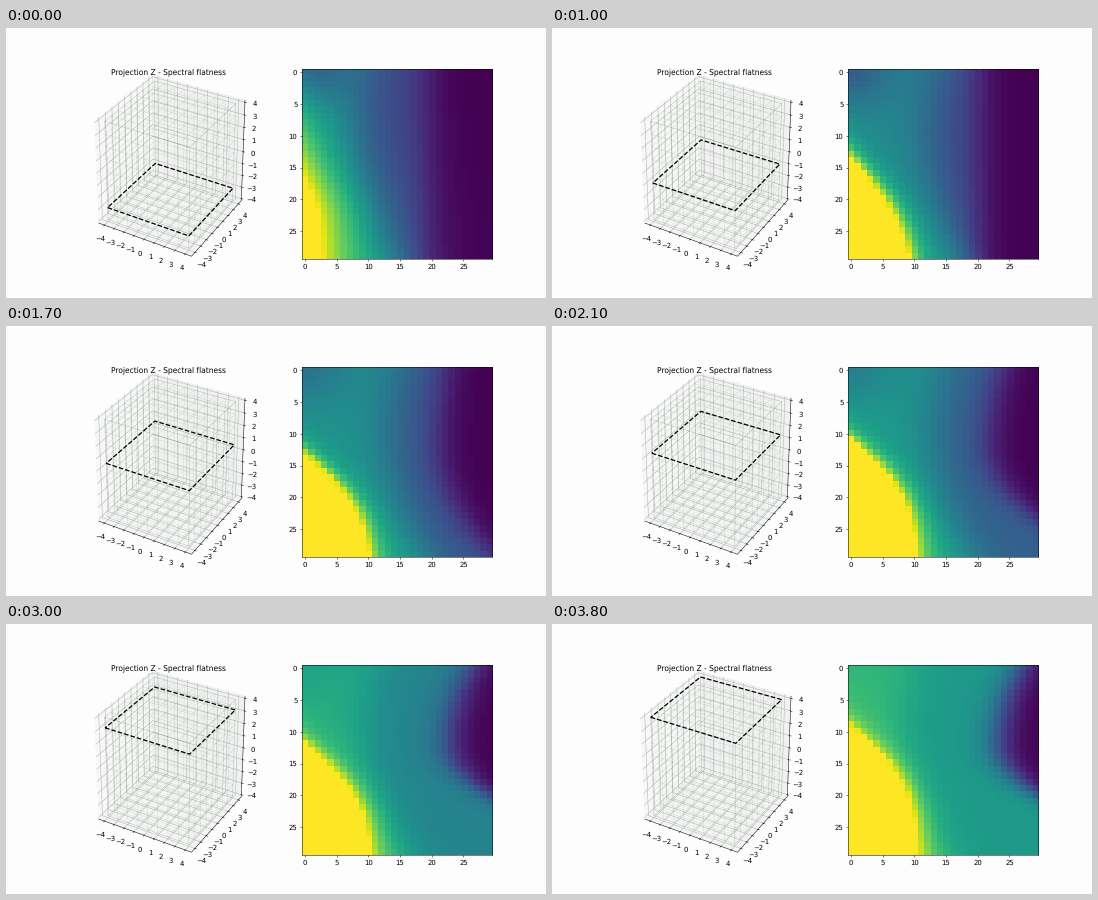
A matplotlib script that plays this animation: 540 px wide and 270 px high, repeating every 3.9 s.

```python
import numpy as np
import matplotlib.pyplot as plt
from matplotlib.animation import FuncAnimation

W, H, DPI = 540, 270, 45
FRAMES, INTERVAL = 39, 100
STEPS = 39                   # slices between z = -4 and z = 4
START = 5                    # slice shown first
PAPER = "#fefdfe"
plt.rcParams.update({"font.family": "DejaVu Sans", "text.hinting": "none",
                     "xtick.labelsize": 11, "ytick.labelsize": 11})

fig = plt.figure(figsize=(W / DPI, H / DPI), dpi=DPI, facecolor=PAPER)
stage = fig.add_axes([0, 0, 1, 1])
stage.set(xlim=(0, W), ylim=(H, 0))
stage.axis("off")

# ---- 3D box: perspective camera around a unit cube ----
AZIM, ELEV, DIST = np.radians(-60), np.radians(30), 10
FORWARD = np.array([np.cos(AZIM) * np.cos(ELEV),
                    np.sin(AZIM) * np.cos(ELEV), np.sin(ELEV)])
RIGHT = np.array([-np.sin(AZIM), np.cos(AZIM), 0])
UP = np.cross(FORWARD, RIGHT)

HALF = 0.5 + 1 / 48          # the panes lie slightly outside the limits
LABEL = HALF + 0.0722
SCALE = np.array([1 / 8.8, 1 / 8.8, 1 / 8])
TICKS = np.arange(-4, 5)
SIDE = 4 * SCALE[0]


def project(points):
    p = np.asarray(points, float)
    depth = DIST - p @ FORWARD
    x = 67.5 + 190.2 * (p @ RIGHT / depth + 0.095) / 0.185
    y = 241 - 207.9 * (p @ UP / depth + 0.095) / 0.185
    return x, y


def line(*points, color="black", lw=0.8, **kw):
    return stage.plot(*project(points), color=color, lw=lw, **kw)[0]


def draw_panes():
    h = HALF
    panes = [
        ([(-h, -h, -h), (-h, h, -h), (-h, h, h), (-h, -h, h)], 0.95),
        ([(-h, h, -h), (h, h, -h), (h, h, h), (-h, h, h)], 0.90),
        ([(-h, -h, -h), (h, -h, -h), (h, h, -h), (-h, h, -h)], 0.925),
    ]
    for corners, grey in panes:
        shade = (grey, grey, grey, 0.5)
        stage.fill(*project(corners), facecolor=shade, edgecolor=shade, lw=0.8)


def draw_grid(wall, **style):
    """Lines at every tick on the three faces that meet in one corner."""
    wx, wy, wz = wall
    for t in TICKS:
        x, y, z = t * SCALE
        line((x, -wy, wz), (x, wy, wz), (x, wy, -wz), **style)
        line((-wx, y, wz), (wx, y, wz), (wx, y, -wz), **style)
        line((wx, -wy, z), (wx, wy, z), (-wx, wy, z), **style)


def draw_axes():
    h = HALF
    line((-h, -h, -h), (h, -h, -h), (h, h, -h), (h, h, h))
    out, inn = h + 0.2 / 12, h - 0.1 / 12
    for t in TICKS:
        x, y, z = t * SCALE
        line((x, -out, -h), (x, -inn, -h))
        line((out, y, -h), (inn, y, -h))
        line((out, h, z), (inn, h, z))
        text = str(t).replace("-", "\u2212")
        for spot in ((x, -LABEL, -LABEL), (LABEL, y, -LABEL),
                     (LABEL, LABEL, z)):
            stage.text(*project(spot), text, size=11, ha="center", va="top")


draw_panes()
draw_grid((-HALF, HALF, -HALF), color="#b0b0b0")
for sign in (1, -1):         # green cage: the back faces, then the front ones
    draw_grid((-sign * SIDE, sign * SIDE, -sign * 0.5),
              color="darkgreen", lw=0.7, alpha=0.16)
draw_axes()
stage.text(162.6, 46, "Projection Z - Spectral flatness",
           size=12, ha="center", va="baseline")
plane = line((0, 0, 0), (0, 0, 0), lw=2, ls="--")

# ---- heat map: a saturated front on the left, a dark basin on the right ----
N = 30
Y, X = np.mgrid[:N, :N]


def sigmoid(v):
    return 1 / (1 + np.exp(-np.clip(v, -30, 30)))


def heat(t):
    """Field for progress t in 0..1."""
    early = np.exp(-12 * t)

    # two plateaus, joined by a curved step
    left = 0.42 + 0.24 * t ** 2 + 0.1 * Y / N
    middle = 0.2 + 0.06 * t + 0.28 * t ** 3
    step = 8 + 5 * np.sin(np.pi * t) + 4 * ((Y - 11) / 15) ** 2
    field = middle + (left - middle) * sigmoid((step - X) / 2.2)
    field -= 0.2 * (1 - t) * np.exp(-(X / 6) ** 2 - (Y / 5) ** 2)

    # dark basin, closing above and below its middle row
    closing = np.clip((t - 0.38) / 0.4, 0, 1)
    bend = np.where(Y < 12, 0.025, 0.1) * (Y - 12) ** 2
    field *= sigmoid((19 + 4 * t + closing * bend - X) / 1.6)

    # bright front, wobbling as it climbs
    top = 15.7 - 5.5 * t + 1.3 * np.cos(2 * np.pi * t / 0.42)
    slope = 0.5 + 0.65 * min(1, (t / 0.38) ** 2)
    width = 10.8 - 8 * early
    rise = slope * (Y - top)
    front = np.minimum(rise, width * np.tanh(rise / width))
    glow = np.exp(np.minimum(front - X, 0) / (1.7 + 3.5 * early))
    return field + (1 - field) * glow


chart = fig.add_subplot(1, 2, 2)
image = chart.imshow(heat(0), cmap="viridis", vmin=0, vmax=1)
chart.set_xticks(np.arange(0, N, 5))
chart.set_yticks(np.arange(0, N, 5))


def update(frame):
    step = min(frame + START, STEPS)
    z = (-4 + 8 * step / STEPS) * SCALE[2]
    s = SIDE
    plane.set_data(*project([(-s, -s, z), (s, -s, z), (s, s, z),
                             (-s, s, z), (-s, -s, z)]))
    image.set_data(heat((step - START) / (STEPS - START)))
    return plane, image


anim = FuncAnimation(fig, update, frames=FRAMES, interval=INTERVAL,
                     repeat=True, repeat_delay=0, blit=False)
plt.show()
```
